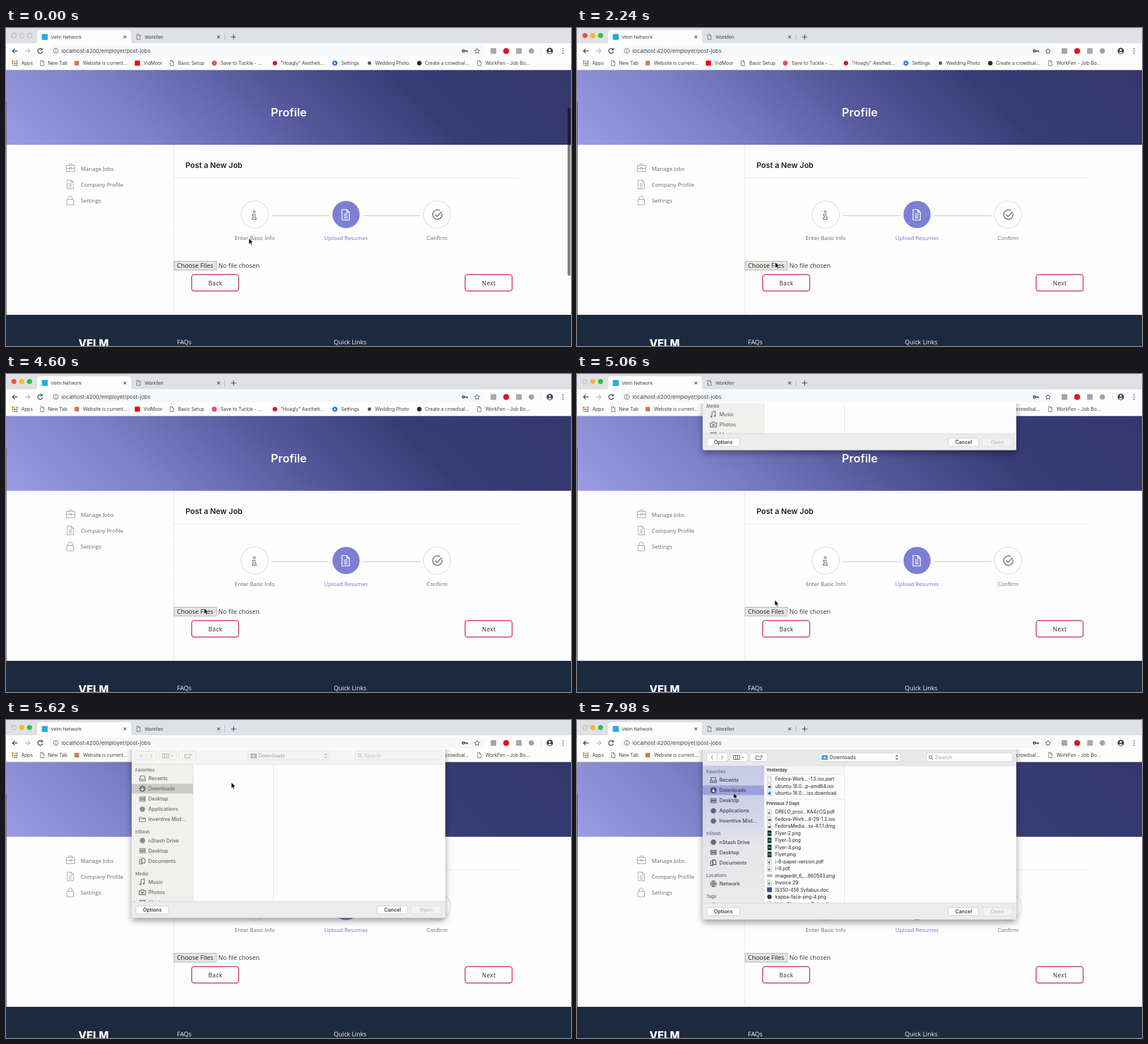
An HTML page for the animation above (8000 ms loop, 998 px wide and 561 px high).

```html
<!DOCTYPE html>
<html lang="en">
<head>
<meta charset="utf-8">
<title>Post a new job</title>
<style>
html, body { margin: 0; width: 100%; height: 100%; overflow: hidden; background: #fdfdfd; }
svg { display: block; width: 100vw; height: 100vh; }
text { font-family: Inter, sans-serif; font-size: 8.3px; fill: #3c4043; white-space: pre; }
.tab { font-size: 8.2px; }
.url { font-size: 9.45px; fill: #44474b; }
.web { font: 9.75px "Open Sans", sans-serif; fill: #666; }
.big { font: 11px "Open Sans", sans-serif; fill: #333; }
.btn { font: 10px "Open Sans", sans-serif; letter-spacing: .7px; fill: #222; }
.foot { font: 500 10.9px "Open Sans", sans-serif; fill: #f4f6f8; }
.title { font-size: 20.2px; font-weight: 600; fill: #fff; }
.head { font-size: 13.5px; font-weight: 600; fill: #1f1f26; }
.brand { font-size: 18.5px; font-weight: 800; fill: #fff; }
.side { font-size: 8.85px; font-weight: 500; }
.cap { font-size: 7.6px; font-weight: 600; }
.file { fill: #222; }
.mid { text-anchor: middle; }
.line { fill: none; stroke: currentColor; }
.anim { animation: 8s step-end infinite; }
.unfocused { animation-name: unfocused; }
.blocked { animation-name: blocked; }
.pressed { animation-name: pressed; }
.idle { animation-name: idle; }
.ready { animation-name: ready; }
.bar { animation: bar 8s linear infinite; }
.sheet { animation: sheet 8s cubic-bezier(.37, 0, .63, 1) infinite; }
.cursor { animation: cursor 8s ease-in-out infinite; }
@keyframes unfocused { 0% { opacity: 1 } 11.25%, 100% { opacity: 0 } }
@keyframes blocked { 0% { opacity: 0 } 59.1%, 100% { opacity: 1 } }
@keyframes pressed { 0% { opacity: 0 } 39% { opacity: 1 } 42.5%, 100% { opacity: 0 } }
@keyframes idle { 0% { opacity: 1 } 75%, 100% { opacity: 0 } }
@keyframes ready { 0% { opacity: 0 } 75%, 100% { opacity: 1 } }
@keyframes bar { 0%, 13% { opacity: 1 } 16% { opacity: .45 } 21%, 100% { opacity: 0 } }
@keyframes sheet {
  0%, 59.04% { transform: translateY(-300px) }
  71.02%, 100% { transform: translateY(0) }
}
@keyframes cursor {
  0%, 1.5% { transform: translate(429px, 371px) }
  10%, 61.75% { transform: translate(350px, 413px) }
  66.25% { transform: translate(347px, 352px) }
  70.25%, 72% { transform: translate(398px, 110px) }
  82%, 100% { transform: translate(276.5px, 128.5px) }
}
</style>
</head>
<body>
<svg id="stage" viewBox="0 0 998 561" preserveAspectRatio="none"></svg>
<script>
const text = (x, y, s, cls = '', attr = '') => `<text x="${x}" y="${y}" class="${cls}" ${attr}>${s}</text>`;
const rect = (x, y, w, h, fill, attr = '') => `<rect x="${x}" y="${y}" width="${w}" height="${h}" fill="${fill}" ${attr}/>`;
const dot = (x, y, r, fill, attr = '') => `<circle cx="${x}" cy="${y}" r="${r}" fill="${fill}" ${attr}/>`;
const path = (d, color, width = 1, attr = '') => `<path d="${d}" class="line" color="${color}" stroke-width="${width}" ${attr}/>`;
const group = (body, attr) => `<g ${attr}>${body}</g>`;
const at = (x, y, body) => group(body, `transform="translate(${x} ${y})"`);
const square = (x, y, r, fill) => rect(x - r, y - r, 2 * r, 2 * r, fill, 'rx="1"');

const page = (x, y, color = '#5f6368', s = 1) => at(x, y, path(
  `M${-3 * s} ${-4.5 * s}h${3.5 * s}l${2.5 * s} ${2.5 * s}v${6.5 * s}h${-6 * s}zM${.5 * s} ${-4.5 * s}v${2.5 * s}h${2.5 * s}`, color, .9));
const sheetOfText = (x, y, color, s, width) => at(x, y, path(
  `M${-5 * s} ${-7 * s}h${6.5 * s}l${3.5 * s} ${3.5 * s}v${10.5 * s}h${-10 * s}zM${1.5 * s} ${-7 * s}v${3.5 * s}h${3.5 * s}` +
  `M${-2.5 * s} ${-1 * s}h${5 * s}m${-5 * s} ${2.5 * s}h${5 * s}m${-5 * s} ${2.5 * s}h${5 * s}`, color, width));
const gear = (x, y) => dot(x, y, 2.7, 'none', 'stroke="#1a73e8" stroke-width="2.2"') +
  dot(x, y, 4.2, 'none', 'stroke="#1a73e8" stroke-width="1.4" stroke-dasharray="1.7 1.6"');

function browser() {
  const lights = ['#fb4a4a', '#f8b429', '#2cc13f'];
  const light = (i, fill, stroke) => dot(14 + 13.8 * i, 13.3, 4.1, fill, `stroke="${stroke}" stroke-width=".7"`);
  const grey = i => light(i, '#d9dbde', '#bfc1c4');
  const bookmarks = [
    [27, 'Apps'], [74, 'New Tab', page(64, 62)], [136, 'Website is current...', square(125, 62, 4, '#cf7a4d')],
    [243, 'VidMoor', square(232, 62, 4.5, '#f00')], [304, 'Basic Setup', page(293, 62)],
    [379, 'Save to Tuckle - ...', dot(368, 62, 4.5, '#e5536b')], [485, '"Hoagly" Aestheti...', dot(475, 62, 4, '#cf2030')],
    [592, 'Settings', gear(581, 62)], [652, 'Wedding Photo', square(642, 62, 2.7, '#4a5070')],
    [740, 'Create a crowdsal...', dot(730, 62, 4, '#2b2b2b')], [847, 'WorkFen - Job Bo...', page(836, 62)]
  ];
  const hues = ['#ea4335', '#34a853', '#4285f4', '#fbbc04'];
  const apps = Array.from({ length: 9 }, (_, i) =>
    rect(10.7 + 3.6 * (i % 3), 57.5 + 3.6 * Math.floor(i / 3), 2.4, 2.4, hues[(i * 3 + (i > 4)) % 4])).join('');
  const cross = x => path(`M${x - 2.4} 13.4l4.8 4.8m0-4.8l-4.8 4.8`, '#44474b', 1.1);
  return rect(0, 0, 998, 28, '#dee1e6') + rect(0, 27, 998, 47, '#fdfdfd') +
    '<path d="M50 27.5q5 0 5-5V9q0-5 5-5h156q5 0 5 5v13.500q0 5 5 5z" fill="#fdfdfd"/>' +
    lights.map((c, i) => light(i, c, c)).join('') +
    group([0, 1, 2].map(grey).join(''), 'class="anim unfocused"') +
    group(grey(0), 'class="anim blocked"') +
    square(68.500, 15.7, 5.3, '#25addf') + text(79, 18.700, 'Velm Network', 'tab') + cross(210) +
    page(234, 15.7) + text(245, 18.7, 'Workfen', 'tab') + cross(375.5) +
    path('M386.500 10v12', '#a9adb3', .8) + path('M397.5 15.8h9m-4.500-4.5v9', '#4c4f53', 1.3) +
    path('M20.500 40.500h-9m4-4l-4 4 4 4', '#3c4043', 1.4) + path('M33.500 40.500h9m-4-4l4 4-4 4', '#b4b7bb', 1.3) +
    path('M63.700 38a4.200 4.200 0 1 0 .7 3.500', '#3c4043', 1.4) + path('M64.700 35.500v3.500h-3.500z', '#3c4043', .8) +
    rect(77, 31, 769, 18.5, '#f6f7f8', 'rx="9.2"') +
    dot(88, 40.3, 4.1, 'none', 'stroke="#5f6368"') + path('M88 39.600v3m0-5v1', '#5f6368', 1) +
    text(98, 43.6, 'localhost:4200/employer/post-jobs', 'url') +
    dot(808, 40.5, 1.9, 'none', 'stroke="#44474b" stroke-width="1.600"') + path('M810 40.500h5v2.200m-2-2.200v1.500', '#44474b', 1.5) +
    path('M832 36l1.400 3.100 3.300.3-2.500 2.200.7 3.300-2.900-1.700-2.900 1.700.7-3.300-2.500-2.200 3.300-.3z', '#44474b', .9) +
    square(861, 40.5, 5, '#a4a6aa') + dot(883.5, 40.5, 5.3, '#dd1420') + square(906, 40.5, 5, '#a8aaad') +
    dot(928, 40.5, 4.8, '#a1a3a6') + path('M945.500 34v13', '#d5d7da', .8) +
    dot(960.5, 40.5, 5.7, '#44485a') + dot(960.5, 38.8, 1.7, '#fff') + '<path d="M957 43.500q3.500-3 7 0-3.500 3-7 0" fill="#fff"/>' +
    [36.5, 40.5, 44.5].map(y => dot(984, y, 1, '#44474b')).join('') + apps +
    bookmarks.map(([x, s, icon = '']) => icon + text(x, 65, s)).join('') +
    rect(0, 73.5, 998, .8, '#d8dae0');
}

function website() {
  const step = (x, label, active) => dot(x, 329, 24, active ? '#7c80d5' : '#fdfdfd',
    active ? '' : 'stroke="#cfcfe2" stroke-width="1.200" stroke-dasharray="2 .7"') +
    text(x, 374, label, 'web mid', active ? 'style="fill:#6c71c4"' : '');
  const outline = (x, s) => rect(x, 435, 83, 29, '#fdfdfd', 'rx="4.500" stroke="#c92d5a" stroke-width="1.500"') +
    text(x + 42, 453.7, s, 'btn mid');
  return rect(0, 74, 998, 132, 'url(#hero)') + text(499.5, 155.6, 'Profile', 'title mid') +
    path('M296.500 206v300', '#d7d7ea', 1, 'stroke-dasharray="2 1"') +
    path('M297 264.500h607', '#dcdcf2', 1, 'stroke-dasharray="3 1.500"') +
    path('M106.500 242.500h15v11h-15zM111 242v-2h6v2M106.500 247.500h6m3 0h6M112.500 246h3v3h-3z', '#96969c', .9) +
    sheetOfText(113.5, 276, '#96969c', 1.1, .9) +
    path('M107.500 302.500h12v9.500h-12zM110 302v-2a3.500 3.500 0 0 1 7 0v2', '#96969c', .9) +
    text(132, 251.5, 'Manage Jobs', 'web') + text(132, 280, 'Company Profile', 'web') + text(132, 308.3, 'Settings', 'web') +
    text(317, 246.6, 'Post a New Job', 'head') +
    path('M469.500 331h102M631 331h101', '#d8d5ce', 1.5) +
    step(439.3, 'Enter Basic Info') + step(600.7, 'Upload Resumes', true) + step(761.5, 'Confirm') +
    dot(438.5, 324, 1.8, 'none', 'stroke="#666" stroke-width="1.100"') +
    path('M435.500 328.500h4.500v6.500h2v2.500h-7v-2.500h2v-4h-1.500z', '#666', 1.1) +
    sheetOfText(600, 329.5, '#fff', 1.3, 1.4) +
    path('M770 327a8.300 8.300 0 1 1-3.500-4.800M758 329l3.500 3.500 8-8.500', '#666', 1.5) +
    rect(297, 411.5, 74.5, 15.5, '#e5e6e0', 'stroke="#9c9c9c" stroke-width=".8"') +
    group(rect(296.5, 411, 75.500, 16.500, '#a6a6a4'), 'class="anim pressed"') +
    text(302, 422.7, 'Choose Files', 'big', 'style="fill:#1c1c1c"') + text(375, 422.7, 'No file chosen', 'big') +
    outline(328, 'Back') + outline(811, 'Next') +
    rect(0, 506, 998, 55, '#1c2a40') + text(128, 563, 'VELM', 'brand') +
    text(302, 557.7, 'FAQs', 'foot') + text(579, 557.7, 'Quick Links', 'foot') +
    rect(0, 130, 1, 376, '#55566a') +
    rect(992, 141, 5, 296, 'rgba(0,0,0,.5)', 'rx="2.500" class="bar"');
}

const glyphs = {
  tray: c => path('M-5 1l1.500-5.500h7L5 1v3.500H-5zM-5 1h3l1 1.500h2L2 1h3', c, 1.2),
  down: c => dot(0, 0, 5.6, c) + path('M0-3.200v6m-2.500-2.500L0 2.800 2.500.3', '#fff', 1.3),
  desk: c => rect(-5.5, -4.5, 11, 9, c, 'rx="1" opacity=".75"') + path('M-4-2.500h8M-4 2.500h8', '#fff', .8),
  mark: c => dot(0, 0, 4.8, c, 'opacity=".8"'),
  folder: c => path('M-5.500-4h4l1 1.500h6v6.500h-11zM-5.500-1h11', c, 1),
  docs: c => path('M-5-2.500h4V5h-4zM-1.500-5h3.500l2.500 2.500V3.500h-6z', c, 1.2),
  music: c => path('M-2.500 3.500v-8l6-1.200v7.500', c, 1.2) + dot(-3.7, 3.8, 1.7, c) + dot(2.3, 2.6, 1.7, c),
  camera: c => path('M-5.500-3h3l1-1.500h3l1 1.500h3v7h-11z', c, 1.4) + dot(0, .5, 2, c),
  film: c => rect(-5.5, -4.5, 11, 9, c) + rect(-3, -3, 6, 6, '#eee'),
  globe: c => path('M-5.200 0a5.200 5.200 0 1 0 10.400 0a5.200 5.200 0 1 0-10.400 0h10.400M0-5.200v10.400M0-5.200q-5 5.200 0 10.400q5-5.200 0-10.400', c, 1)
};

function sidebar(on) {
  const ink = on ? '#4a4c58' : '#737373';
  const items = [
    [106, 'Recents', 'tray'], [124, 'Downloads', 'down'], [142.2, 'Desktop', 'desk'], [160.2, 'Applications', 'mark'],
    [178.2, 'Inventive Mist...', on ? 'mark' : 'folder'], [215.6, 'nStash Drive', 'mark'], [233.6, 'Desktop', 'desk'],
    [251.6, 'Documents', 'docs'],
    ...(on ? [[289, 'Network', 'globe'], [327, 'Red', 'mark']]
      : [[289, 'Music', 'music'], [307, 'Photos', 'camera'], [325, 'Movies', 'film']])
  ];
  const caps = [[91, 'Favorites'], [200.2, 'nStash'], [273.7, on ? 'Locations' : 'Media'], ...(on ? [[311, 'Tags']] : [])];
  return rect(222, 81, 108.5, 242, on ? 'url(#tint)' : '#f0f0ed') +
    rect(222, 115.5, 108.5, 17, on ? '#9da1da' : '#cacac8') +
    caps.map(([y, s]) => text(228.5, y + 2.8, s, 'cap', `style="fill:${on ? '#6e7080' : '#777'}"`)).join('') +
    items.map(([y, s, icon]) => at(241, y, glyphs[icon](ink)) +
      text(251.5, y + 3.2, s, 'side', `style="fill:${on ? '#42444e' : '#6a6a6a'}"`)).join('');
}

function toolbar(on) {
  const edge = on ? '#c4c4c4' : '#dcdcdc', ink = on ? '#555' : '#aaa', fill = on ? '#fdfdfd' : '#f4f4f2';
  const box = (x, w) => rect(x, 58, w, 15.5, fill, `rx="3" stroke="${edge}" stroke-width=".8"`);
  return rect(222, 40, 554, 41, on ? '#e9e9e9' : '#f5f5f3') + rect(222, 80.4, 554, .8, '#d3d3d3') +
    box(229, 37) + box(270.5, 31) + box(305.5, 31) + box(427.5, 144) + box(617, 152) +
    path('M247.500 58v15.500', edge, .8) + path('M240 62.500l-3 3.500 3 3.500M255 62.500l3 3.500-3 3.500', on ? '#888' : '#b5b5b5', 1.1) +
    path('M276.500 62.500h11v7h-11zM280 62.500v7m3.800-7v7M291 65l2 2 2-2', ink, 1) +
    path('M316 63.500h3l1 1.200h3.500M316 63.500v6h9v-3M326 62v4m-2-2h4', ink, 1) +
    rect(432, 62, 11, 8.5, on ? '#4aa5dc' : '#b9b9b9', 'rx="1"') + dot(437.5, 66.5, 2, on ? '#bfe2f5' : '#e4e4e4') +
    text(446, 69.2, 'Downloads', '', `style="font-size:8.850px;fill:${on ? '#333' : '#a0a0a0'}"`) +
    path('M563 64.500l2-2 2 2m-4 3l2 2 2-2', ink, 1.2) +
    dot(624.5, 65.3, 2.6, 'none', `stroke="${ink}"`) + path('M626.500 67.500l2.500 2.500', ink, 1) +
    text(633, 69.2, 'Search', '', `style="font-size:8.850px;fill:${on ? '#a5a5a5' : '#bbb'}"`);
}

function files() {
  const recent = ['Fedora-Work...-1.5.iso.part', 'ubuntu-18.0...p-amd64.iso', 'ubuntu-18.0....iso.download'];
  const week = ['DRELO_proo...KA4cCQ.pdf', 'Fedora-Work...4-29-1.2.iso', 'FedoraMedia...sx-4.1.1.dmg', 'Flyer-2.png', 'Flyer-3.png',
    'Flyer-4.png', 'Flyer.png', 'i-9-paper-version.pdf', 'i-9.pdf', 'imageedit_6_...660543.png', 'Invoice 29',
    'IS350-456 Syllabus.doc', 'kappa-face-png-4.png', 'Velm Networ...t_Pub.pdf'];
  const icon = (s, y) => {
    if (s.startsWith('Flyer')) return rect(336.5, y - 5, 7, 10, '#12382f') + rect(337.5, y - 1, 5, 2, '#35b57e');
    if (s.startsWith('image')) return rect(335.5, y - 2.5, 9.5, 5, '#b5b5b5');
    if (s.startsWith('kappa')) return dot(340, y, 4, '#3d3d3d');
    if (s.endsWith('.doc')) return square(340, y, 4.3, '#2b5797');
    const core = /iso$|dmg$/.test(s) ? rect(337.8, y, 4.5, 3, '#444') : s.endsWith('load') ? dot(340, y + .5, 2.5, '#2487d0')
      : s.endsWith('part') ? '' : dot(339.5, y + 1.5, 2, '#7189ad');
    return page(340, y, '#b4b4b4', 1.1) + core;
  };
  const row = (s, y) => icon(s, y) + text(350, y + 3, s, 'file');
  const cap = (s, y) => text(334.5, y + 2.8, s, 'cap', 'style="fill:#333"');
  return rect(331, 81, 141, 15, '#f6f6f6') + path('M331 96.500h141M331 139.500h141', '#dedede', .8) +
    cap('Yesterday', 88) + cap('Previous 7 Days', 147.5) +
    recent.map((s, i) => row(s, 104.2 + 12.4 * i)).join('') +
    week.map((s, i) => row(s, 162.4 + 12.47 * i)).join('');
}

function dialog() {
  const button = (x, w, s, off) => rect(x, 331, w, 14, off ? '#f3f3f3' : '#fff', `rx="3" stroke="${off ? '#dadada' : '#c2c2c2'}" stroke-width=".8"`) +
    text(x + w / 2, 341.2, s, 'side mid', `style="fill:${off ? '#b8b8b8' : '#222'}"`);
  const state = on => toolbar(on) + group(sidebar(on) + (on ? files() : ''), 'clip-path="url(#panes)"');
  const body = rect(222, 40, 554, 312, '#ececec', 'rx="3" filter="url(#shadow)"') +
    rect(331, 81, 445, 242, '#fdfdfd') +
    group(state(false), 'class="anim idle"') + group(state(true), 'class="anim ready"') +
    path('M472.500 81v242M330.500 81v242', '#dcdce4', .8) + rect(222, 322.6, 554, .8, '#cfcfcf') +
    button(229.5, 58, 'Options') + button(656, 53.5, 'Cancel') + button(715.5, 53.5, 'Open', true);
  return group(group(group(body, 'class="sheet"'), 'class="anim blocked"'), 'clip-path="url(#below)"');
}

const stops = list => list.map(([o, c]) => `<stop offset="${o}" stop-color="${c}"/>`).join('');
const defs = `<defs>
  <linearGradient id="hero" gradientUnits="userSpaceOnUse" x1="216.500" y1="422.500" x2="781.500" y2="-142.500">${
    stops([[0, '#9a9de2'], [.25, '#7c7fc5'], [.5, '#54589b'], [.72, '#383c76'], [1, '#33376d']])}</linearGradient>
  <linearGradient id="tint" x2="0" y2="1">${stops([[0, '#c6c8e6'], [.35, '#d3d4e8'], [.6, '#e6e6ea'], [1, '#ebebea']])}</linearGradient>
  <filter id="shadow" x="-10%" y="-10%" width="120%" height="125%"><feDropShadow dx="0" dy="5" stdDeviation="6" flood-opacity=".38"/></filter>
  <clipPath id="panes">${rect(222, 81, 554, 242, '#000')}</clipPath>
  <clipPath id="below">${rect(0, 52, 998, 509, '#000')}</clipPath>
</defs>`;

const pointer = group('<path d="M0 0V10.500L2.400 8.300 4.100 12 5.900 11.200 4.300 7.600H7.500Z" stroke="#fff" stroke-width=".8"/>', 'class="cursor"');

document.getElementById('stage').innerHTML =
  defs + rect(0, 0, 998, 561, '#fdfdfd') + website() + browser() + dialog() + pointer;
</script>
</body>
</html>
```
